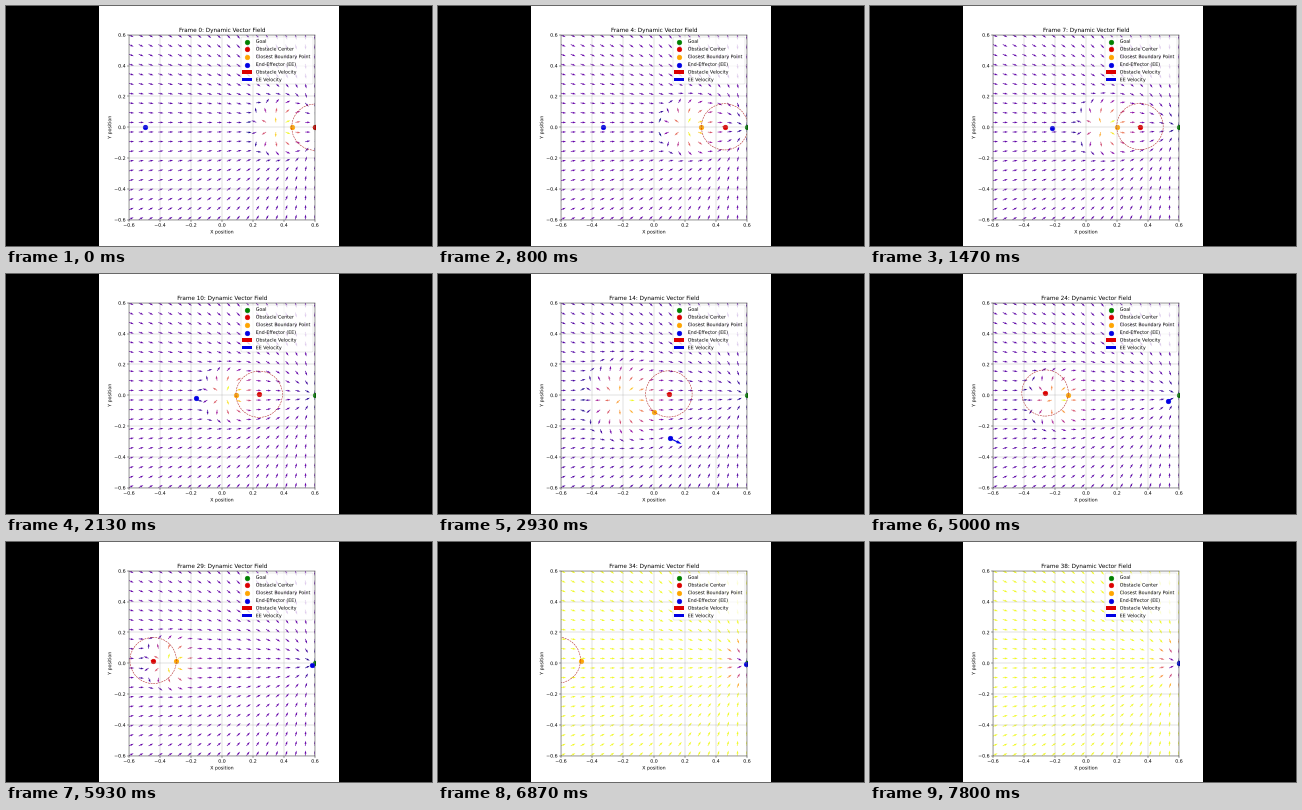
Animation of 426x240 px, one loop 7.87 s. Source, as a matplotlib script:

```python
import numpy as np
import matplotlib.pyplot as plt
from matplotlib.animation import FuncAnimation
from matplotlib.patches import Circle, Rectangle
from matplotlib.patheffects import Normal
from matplotlib.text import Text

plt.rcParams["text.hinting"] = "none"

W, H, DPI = 426, 240, 34
LOOP, TICKS, HOLD = 7870, 118, 3
STEPS = 39
LIM, RADIUS = 0.6, 0.15
GOAL = np.array([LIM, 0.0])
RED, BLUE, RING = "#dc0000", "#0000e4", "#b02020"

# Paths of the obstacle and of the end-effector, one point per step
steps = np.arange(STEPS)
obstacle = np.column_stack([LIM - 0.036 * steps, 0.0006 * steps])
KEYS = [0, 4, 7, 10, 11, 12, 13, 14, 15, 17, 20, 24, 29, 38]
KEY_X = [-0.5, -0.33, -0.22, -0.165, -0.16, -0.13, -0.04, 0.103,
         0.17, 0.25, 0.368, 0.53, 0.58, 0.6]
KEY_Y = [0, 0, -0.005, -0.02, -0.06, -0.13, -0.21, -0.28,
         -0.265, -0.21, -0.13, -0.035, -0.01, 0]
effector = np.column_stack([np.interp(steps, KEYS, k) for k in (KEY_X, KEY_Y)])


def velocity(path, n):
    n = max(n, 1)
    return path[n] - path[n - 1]


def closest_point(n):
    """Boundary point facing the end-effector, one step late."""
    prev = max(n - 1, 0)
    d = effector[prev] - obstacle[prev]
    return obstacle[n] + RADIUS * d / np.hypot(*d)


axis = np.linspace(-LIM, LIM, 20)
X, Y = np.meshgrid(axis, axis)


def field(n):
    """Unit direction and strength of the field on the grid."""
    dx, dy = GOAL[0] - X, GOAL[1] - Y
    dist = np.hypot(dx, dy)
    pull = np.minimum(dist / 0.2, 1) / dist
    u, v = pull * dx, pull * dy
    if obstacle[n, 0] > -LIM:
        rel = velocity(obstacle, n) - velocity(effector, n)
        speed = np.hypot(*rel)
        cx, cy = closest_point(n) + 1.2 * rel
        rx, ry = X - cx, Y - cy
        r = np.hypot(rx, ry) + 1e-9
        spread = 0.078 + 0.29 * speed
        push = (4.5 + 6 * speed) * np.exp(-0.5 * (r / spread) ** 2) / r
        u, v = u + push * rx, v + push * ry
    mag = np.hypot(u, v)
    return u / mag, v / mag, mag


fig = plt.figure(figsize=(W / DPI, H / DPI), dpi=DPI, facecolor="black")
fig.add_artist(Rectangle((93 / W, 0), 240 / W, 1, color="white", lw=0, zorder=-1))
ax = fig.add_axes([123 / W, 0.11, 186 / W, 0.77])
ticks = np.linspace(-LIM, LIM, 7)
ax.set(xlim=(-LIM, LIM), ylim=(-LIM, LIM), xticks=ticks, yticks=ticks,
       xlabel="X position", ylabel="Y position")
ax.xaxis.set_major_formatter("{x:.1f}")
ax.yaxis.set_major_formatter("{x:.1f}")
ax.grid(True)
title = ax.set_title("")

arrows = ax.quiver(X, Y, *field(0), cmap="plasma", scale=36, width=0.0035)


def dot(pos, color, label):
    return ax.scatter(*pos, s=100, color=color, label=label)


def speed_arrow(color, label):
    return ax.quiver([0], [0], [0.1], [0], color=color, label=label, width=0.006,
                     angles="xy", scale_units="xy", scale=1.9)


dot(GOAL, "green", "Goal")
obs_dot = dot(obstacle[0], RED, "Obstacle Center")
near_dot = dot(closest_point(0), "orange", "Closest Boundary Point")
eff_dot = dot(effector[0], BLUE, "End-Effector (EE)")
ring = ax.add_patch(Circle(obstacle[0], RADIUS, fill=False, ec=RING, ls="--", lw=1.1))
obs_arrow = speed_arrow(RED, "Obstacle Velocity")
eff_arrow = speed_arrow(BLUE, "EE Velocity")
ax.legend(loc="upper right", labelspacing=0.6)

# Outlined glyphs keep their true spacing at this small size
for text in fig.findobj(Text):
    text.set_path_effects([Normal()])


def move_arrow(arrow, path, n):
    vx, vy = velocity(path, n)
    arrow.set_offsets([path[n]])
    arrow.set_UVC([vx], [vy])


def update(tick):
    n = min(tick // HOLD, STEPS - 1)
    title.set_text(f"Frame {n}: Dynamic Vector Field")
    u, v, mag = field(n)
    arrows.set_UVC(u, v, mag)
    arrows.set_clim(mag.min(), mag.max())
    obs_dot.set_offsets([obstacle[n]])
    near_dot.set_offsets([closest_point(n)])
    eff_dot.set_offsets([effector[n]])
    ring.center = obstacle[n]
    move_arrow(obs_arrow, obstacle, n)
    move_arrow(eff_arrow, effector, n)
    return []


anim = FuncAnimation(fig, update, frames=TICKS, interval=LOOP / TICKS,
                     init_func=lambda: [], repeat=True, repeat_delay=0)
plt.show()
```
